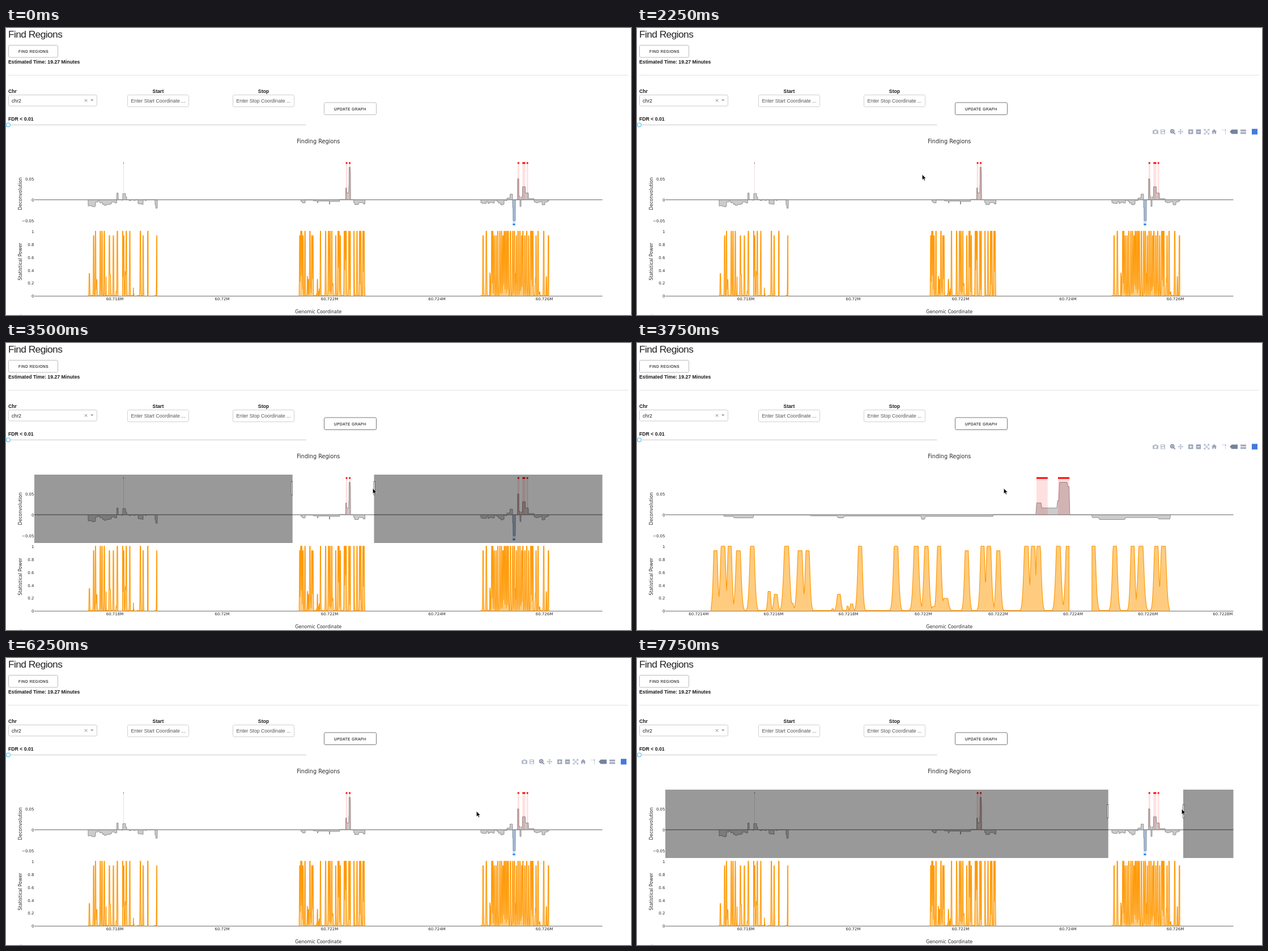
An HTML page with a canvas that plays this animation: 1103 px wide and 508 px high, repeating every 8 s.

```html
<!DOCTYPE html>
<html lang="en">
<head>
<meta charset="utf-8">
<title>Find Regions</title>
<style>
html, body { margin: 0; width: 100%; height: 100%; overflow: hidden; background: #fff; }
canvas, svg { position: absolute; left: 0; top: 0; width: 1103px; height: 508px; }
text { font-family: "Liberation Sans", Arial, sans-serif; white-space: pre; }
.plot { font-family: "DejaVu Sans", Verdana, sans-serif; fill: #2a2a2a; }
.bold { font-weight: bold; fill: #1a1a1a; }
</style>
</head>
<body>
<canvas id="stage" width="1103" height="508"></canvas>
<svg id="labels" viewBox="0 0 1103 508"></svg>
<script>
const ctx = document.getElementById('stage').getContext('2d');
const svg = document.getElementById('labels');
const LEFT = 50, RIGHT = 1052.5, ZERO = 304, FLOOR = 474.5, FULL = 115;
const LOOP = 8000, STEP = 250;
const ZOOM_FROM = 505.7, ZOOM_TO = 649.5;
const ZOOM = (RIGHT - LEFT) / (ZOOM_TO - ZOOM_FROM);

// ---------- text ----------
function node(tag, attrs, parent) {
  const el = document.createElementNS(svg.namespaceURI, tag);
  for (const k in attrs) el.setAttribute(k, attrs[k]);
  return parent.appendChild(el);
}
function label(str, x, y, size, attrs = {}, parent = svg) {
  node('text', { x, y, 'font-size': size, ...attrs }, parent).textContent = str;
}
const bold = { class: 'bold' };
const mid = { 'text-anchor': 'middle' };
const caps = { 'letter-spacing': 0.58, fill: '#222', stroke: '#222', 'stroke-width': 0.15 };
const plot = { class: 'plot', ...mid };

label('Find Regions', 4, 16.8, 17.4, { 'letter-spacing': -0.6, fill: '#222' });
label('FIND REGIONS', 22, 44.4, 6.4, caps);
label('Estimated Time: 19.27 Minutes', 4, 62.8, 8.7, bold);
label('Chr', 4, 114.5, 8.7, bold);
label('Start', 268.5, 114.5, 8.7, { ...bold, ...mid });
label('Stop', 454.5, 114.5, 8.7, { ...bold, ...mid });
label('chr2', 10, 131.5, 8.7, { fill: '#222' });
label('Enter Start Coordinate ...', 220.5, 131.8, 8.7, { fill: '#555' });
label('Enter Stop Coordinate ...', 406.5, 131.8, 8.7, { fill: '#555' });
label('UPDATE GRAPH', 579, 145.6, 6.4, caps);
label('FDR < 0.01', 4, 164, 8.7, bold);
label('Finding Regions', 551.3, 204, 9.7, plot);
label('Genomic Coordinate', 551.3, 504.5, 8, plot);
label('Deconvolution', 0, 0, 8, { ...plot, transform: 'translate(28.3 293.3) rotate(-90)' });
label('Statistical Power', 0, 0, 8, { ...plot, transform: 'translate(28.3 413.5) rotate(-90)' });

const yTick = (str, y) => label(str, 49.5, y, 7, { class: 'plot', 'text-anchor': 'end' });
['0.05', '0', '\u22120.05'].forEach((s, i) => yTick(s, 269.5 + i * 37.2));
['1', '0.8', '0.6', '0.4', '0.2', '0'].forEach((s, i) => yTick(s, 362.8 + i * 22.9));

function xTicks(count, first, step, x, dx) {
  const group = node('g', {}, svg);
  for (let i = 0; i < count; i++)
    label(+(first + i * step).toFixed(4) + 'M', x + i * dx, 482.1, 7, plot, group);
  return group;
}
const wideTicks = xTicks(5, 60.718, 0.002, 192, 189.5);
const zoomTicks = xTicks(8, 60.7214, 0.0002, 108.8, 132.15);
const arrow = node('path', {
  d: 'M-.7-.7V8.9L1.5 6.8 3 10.3 4.6 9.6 3.2 6.3H6.1Z',
  fill: '#000', stroke: '#fff', 'stroke-width': 0.6
}, svg);

// ---------- data, in pixels of the wide view ----------
function random(seed) {
  return () => (seed = (seed * 16807) % 2147483647) / 2147483647;
}

// Tall peaks at the given places, plus low bumps scattered over [from, to].
function makePeaks(seed, places, from, to, bumps) {
  const rnd = random(seed);
  const peaks = places.map(x => ({ x, h: rnd() < 0.25 ? 0.93 : 1, w: 0.6 + 0.2 * rnd() }));
  for (let i = 0; i < bumps; i++)
    peaks.push({ x: from + (to - from) * rnd(), h: 0.03 + 0.35 * rnd() ** 2, w: 0.2 + 0.6 * rnd() });
  return peaks;
}
function power(peaks, x) {
  let v = 0.008;
  for (const { x: c, h, w } of peaks)
    v = Math.max(v, h * Math.min(1, 1.6 * Math.exp(-(((x - c) / w) ** 2))));
  return v;
}

// Splits the low stretches of a step curve into small uneven steps.
function roughen(seed, levels) {
  const rnd = random(seed), out = [];
  levels.forEach(([x, h], i) => {
    out.push([x, h]);
    const end = i + 1 < levels.length ? levels[i + 1][0] : x;
    if (h > 0) return;
    for (let s = x + 2 + 3 * rnd(); s < end - 1; s += 1.5 + 3 * rnd())
      out.push([s, Math.min(0, h + 4 * rnd() - 2)]);
  });
  return out;
}

// A dense comb of peaks fills the middle of the right-hand group.
function comb(from, to, seed) {
  const rnd = random(seed), xs = [];
  for (let x = from; x < to; x += 1.8 + 2.2 * rnd()) xs.push(x);
  return xs;
}

const groups = [
  {
    levels: roughen(5, [[145, -11], [158, -4], [170, -8], [186, -4], [195.5, 12], [198, 0], [206, 11],
      [211, 5], [213, 0], [233, -7], [242, 0], [263, -9], [264.3, -15], [267, 0]]),
    peaks: makePeaks(11, [154.7, 158, 166.4, 169.5, 173.5, 182.5, 189.5, 196.5, 206, 207.8, 212.3, 218.5,
      237.2, 242, 250.3, 266.3], 145, 235, 16),
    spans: [[145, 197.6], [205.6, 226], [231, 243.6], [249.6, 251], [262.5, 266.6]]
  },
  {
    levels: [[520.5, -3], [523, -5.5], [528, -0.7], [542.4, -2], [549.3, -5.5], [550.9, -2.3], [570.5, -8],
      [571.4, -3], [588.7, 0.7], [599.6, 21], [600.9, 12], [604.9, 25], [605.4, 57.5], [607.5, 50], [608, 0],
      [613.7, -5], [615.5, -8.5], [622.1, -5], [630.5, -7.5], [633.5, 0]],
    peaks: makePeaks(23, [518.4, 520.3, 522, 524.2, 527.7, 536.4, 539.8, 541.7, 555, 564.1, 569.2, 571.8, 575,
      582, 586, 587.6, 590, 597.1, 598.8, 600.2, 605.2, 607.6, 614, 619.5, 624, 626.1, 630, 631.8], 530, 580, 15),
    spans: [[517.3, 608], [613.7, 633.4]]
  },
  {
    levels: roughen(9, [[838, -5], [862, -1], [869, -6], [873, -9], [879, -1], [884, 3], [889.5, 10], [894, -14],
      [895, -37], [899, 0], [902.8, 37], [905, 6], [907, -12], [909, 5], [911.5, 23], [916.5, 12],
      [922, 2], [932, -4], [946, -9], [951, -4], [958, 0]]),
    peaks: makePeaks(37, [842, 847.7, ...comb(857.3, 930, 71), 935.5, 939, 949, 957.3], 838, 956, 18),
    spans: [[838, 958]]
  }
];
const bands = [[599.65, 602.5], [605.1, 608], [902.8, 905.8], [911.3, 916.5], [918.8, 921.5]];

// ---------- drawing helpers ----------
function fill(color, x, y, w, h) {
  ctx.fillStyle = color;
  ctx.fillRect(x, y, w, h);
}
function frame(x, y, w, h, color) {
  ctx.strokeStyle = color;
  ctx.lineWidth = 1;
  ctx.beginPath();
  ctx.roundRect(x + 0.5, y + 0.5, w - 1, h - 1, 2.3);
  ctx.stroke();
}
function shape(d, color) {
  ctx.fillStyle = color;
  ctx.fill(new Path2D(d), 'evenodd');
}
function area(points, base, line, width, inside) {
  ctx.beginPath();
  ctx.moveTo(points[0][0], base);
  for (const [x, y] of points) ctx.lineTo(x, y);
  ctx.lineTo(points[points.length - 1][0], base);
  ctx.fillStyle = inside;
  ctx.fill();
  ctx.strokeStyle = line;
  ctx.lineWidth = width;
  ctx.lineJoin = 'round';
  ctx.stroke();
}

function drawForm(pressed) {
  frame(4, 30, 88, 22.5, '#bbb');
  fill('#e1e1e1', 4, 83, 1094, 1);
  frame(4, 118, 157, 20.5, '#ccc');
  frame(214, 118, 109, 22, '#d1d1d1');
  frame(400, 118, 109, 22, '#d1d1d1');
  frame(561, 131.5, 93, 22.5, pressed ? '#777' : '#bbb');
  ctx.strokeStyle = '#888';
  ctx.stroke(new Path2D('M138.8 126l4.6 4.6m0-4.6l-4.6 4.6'));
  shape('M149 126.6h5.6l-2.8 3z', '#999');
  fill('#e4e4e4', 4, 170.3, 525.5, 2.3);
  ctx.beginPath();
  ctx.arc(4, 171.4, 3.4, 0, 7);
  ctx.fillStyle = '#fff';
  ctx.fill();
  ctx.strokeStyle = '#5cc4f2';
  ctx.lineWidth = 1.2;
  ctx.stroke();
  fill('#ddd', 24, 507, 4, 1);
}

function drawTools(alpha) {
  if (!alpha) return;
  const pale = '#b4bacb', dark = '#77829e';
  ctx.globalAlpha = alpha;
  shape('M910 181h2.6l1-1.6h3l1 1.6h2.4v6.5h-10zM917.2 184a2.2 2.2 0 1 0-4.4 0a2.2 2.2 0 1 0 4.4 0z', pale);
  shape('M924 179.4h6.5l1.5 1.5v6.8h-8zM925.4 180.4v2.4h4.2v-2.4zM925.4 184.2v2.6h5.2v-2.6z', pale);
  ctx.strokeStyle = dark;
  ctx.lineWidth = 1.5;
  ctx.stroke(new Path2D('M947.6 182.8a3 3 0 1 0-6 0a3 3 0 1 0 6 0M946.8 185l3 3M943.2 182.8h2.8M944.6 181.4v2.8'));
  ctx.strokeStyle = pale;
  ctx.lineWidth = 1.2;
  ctx.stroke(new Path2D('M959.3 179v9M954.8 183.5h9'));
  shape('M957.3 181l2-2.3 2 2.3zM957.3 186l2 2.3 2-2.3zM956.8 181.5l-2.3 2 2.3 2zM961.8 181.5l2.3 2-2.3 2z', pale);
  for (const x of [973, 986.7]) {
    fill('#9ca5ba', x, 179.5, 8.4, 8.2);
    fill('#fff', x + 1.8, 183, 4.8, 1.3);
  }
  fill('#fff', 976.6, 181.2, 1.3, 4.8);
  ctx.stroke(new Path2D('M1001.8 180.2l7 7m0-7l-7 7M1001 182v-2.6h2.6M1007 179.4h2.6v2.6M1009.6 185.4v2.6h-2.6M1003.6 188h-2.6v-2.6'));
  shape('M1018.6 179l4.8 4.6h-1.4v4h-2.4v-2.6h-2v2.6h-2.4v-4h-1.4z', '#9ca5ba');
  ctx.setLineDash([1.5, 1]);
  ctx.stroke(new Path2D('M1032 180.5h6M1038.5 182v6'));
  ctx.setLineDash([]);
  fill(pale, 1037.4, 179.4, 2.2, 2.2);
  shape('M1046 183.6l3.6-3.8h10.4v7.6h-10.4z', dark);
  shape('M1065 179.8h10v3.3h-10zM1065 184.3h10v3.3h-10z', '#a3abc0');
  fill('#447adb', 1085, 178.5, 10, 10);
  ctx.globalAlpha = 1;
}

function drawPlot(zoomed) {
  const px = x => zoomed ? LEFT + (x - ZOOM_FROM) * ZOOM : x;
  const box = (color, a, y, b, h) => fill(color, px(a), y, px(b) - px(a), h);

  fill('#777', LEFT, ZERO - 0.6, RIGHT - LEFT, 1.2);
  fill('#777', LEFT, FLOOR - 0.5, RIGHT - LEFT, 1.1);
  ctx.save();
  ctx.beginPath();
  ctx.rect(LEFT, 230, RIGHT - LEFT, 250);
  ctx.clip();
  for (const { levels, peaks, spans } of groups) {
    const steps = [];
    let y = ZERO;
    for (const [x, h] of levels) {
      steps.push([px(x - 0.1), y]);
      y = ZERO - h;
      steps.push([px(x + 0.1), y]);
    }
    area(steps, ZERO, '#909090', 1, 'rgba(128,128,128,.4)');
    for (const [from, to] of spans) {
      const curve = [];
      for (let x = from; x <= to; x += 0.1) curve.push([px(x), FLOOR - FULL * power(peaks, x)]);
      area(curve, FLOOR, '#ff9a08', 1.2, 'rgba(255,153,0,.5)');
    }
  }
  for (const [a, b] of bands) {
    box('rgba(255,0,0,.12)', a, 240.5, b, ZERO - 240.5);
    box('#f00', a, 237.5, b, 3);
  }
  box('#a66', 207, 237.5, 208, 3);
  box('#ecdede', 207, 240.5, 208, 51);
  box('rgba(30,130,255,.2)', 894, ZERO, 899, 42);
  box('#1e82ee', 894.3, 346.3, 898.6, 2.9);
  ctx.restore();
}

function drawSelection(from, to, y, alpha) {
  const shade = `rgba(0,0,0,${alpha})`;
  fill(shade, LEFT, 233, from - LEFT, 121);
  fill(shade, to, 233, RIGHT - to, 121);
  for (const x of [from - 2.2, to - 0.3]) {
    fill('#444', x - 0.5, y - 12.3, 3, 24.6);
    fill('#fff', x + 0.3, y - 11.5, 1.4, 23);
  }
}

// ---------- timeline ----------
const pointer = [[750, 604, 146], [1750, 410, 253], [2250, 504, 260], [3500, 648, 258], [3750, 648, 258],
  [4750, 618, 268], [6250, 831, 272], [6500, 872, 273], [7750, 962, 268]];
const tools = [[0, 0], [1250, 0.45], [1500, 1], [2500, 0], [3750, 1], [4750, 0.45], [5000, 1], [6500, 0]];
const drags = [
  { start: 2500, end: 3500, from: ZOOM_FROM, y: 257, first: 530, last: ZOOM_TO },
  { start: 6500, end: 7750, from: 831.7, y: 271.3, first: 868.5, last: 964 }
];

const mix = (a, b, f) => a + (b - a) * f;
const ease = f => f * f * (3 - 2 * f);
function along(keys, t) {
  const i = Math.max(1, keys.findIndex(k => k[0] >= t));
  const [t0, x0, y0] = keys[i - 1], [t1, x1, y1] = keys[i];
  const f = ease(Math.max(0, (t - t0) / (t1 - t0)));
  return [mix(x0, x1, f), mix(y0, y1, f)];
}
const held = (keys, t) => keys.filter(k => k[0] <= t).pop()[1];

function render(time) {
  const t = Math.floor((time % LOOP) / STEP) * STEP;
  const zoomed = t >= 3750 && t < 4750;
  ctx.clearRect(0, 0, 1103, 508);
  drawForm(t >= 750);
  drawTools(held(tools, t));
  drawPlot(zoomed);
  for (const d of drags) {
    if (t < d.start || t > d.end) continue;
    const to = mix(d.first, d.last, ease((t - d.start) / (d.end - d.start)));
    drawSelection(d.from, to, d.y, t === d.start ? 0.34 : 0.4);
  }
  wideTicks.style.display = zoomed ? 'none' : '';
  zoomTicks.style.display = zoomed ? '' : 'none';
  arrow.style.display = t < 750 ? 'none' : '';
  arrow.setAttribute('transform', `translate(${along(pointer, t)})`);
}

const begin = performance.now();
function tick() {
  render(performance.now() - begin);
  requestAnimationFrame(tick);
}
tick();
</script>
</body>
</html>
```
